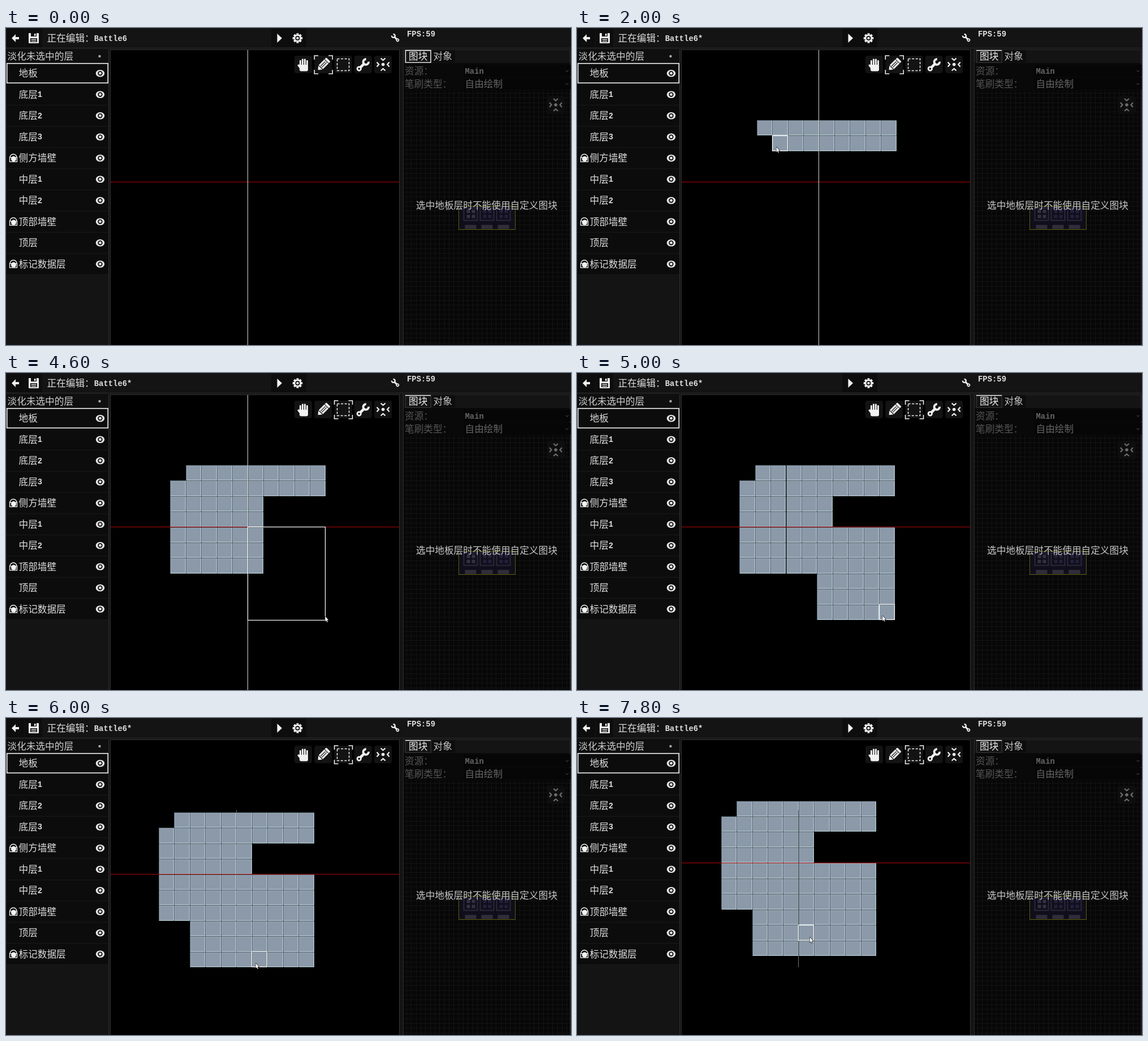
Write an HTML page with a canvas that moves like this. It is 999x561 px and loops after 8000 ms.

```html
<!DOCTYPE html>
<html lang="zh">
<head>
<meta charset="utf-8">
<title>Map editor</title>
<style>
  html, body { margin: 0; width: 100%; height: 100%; overflow: hidden; background: #000; }
  canvas { display: block; width: 999px; height: 561px; }
</style>
</head>
<body>
<canvas id="stage" width="999" height="561"></canvas>
<script>
const ctx = document.getElementById('stage').getContext('2d');
const LOOP = 8000, STEP = 200, CELL = 27.45, UNIT = 25 / 3;
const CJK = '300 16.67px "Noto Sans CJK JP", "Noto Sans CJK SC", "Noto Sans CJK", sans-serif';
const LATIN = 'bold 13.88px "Liberation Mono", monospace';
const WHITE = '#f2f2f2', DARK = '#0f0f0f';

// The hand's script; positions are in map cells. The pointer glides between actions.
const hover = (from, to, at) => ({ from, to, a: at, b: at });
const pen = (from, to, a, b) => ({ from, to, a, b, fill: from });
const area = (from, to, a, b) => ({ from, to, a, b, fill: to + STEP });
const actions = [
  hover(200, 200, [9.5, 3.8]),
  pen(600, 1200, [-3.5, -3.5], [4.5, -3.5]),
  pen(1400, 2000, [4.5, -2.5], [-2.75, -2.28]),
  hover(2400, 2400, [5.5, -6.7]),
  hover(2600, 2600, [6.2, -7.5]),
  area(3200, 3600, [-4.5, -2.5], [0.58, 2.32]),
  area(4000, 4600, [0.5, 0.5], [4.97, 5.74]),
  hover(5000, 5000, [4.2, 5.7]),
  area(5600, 5800, [-2.5, 3.5], [1.23, 5.71]),
  hover(6000, 7200, [1.23, 5.71]),
  hover(7400, 7400, [4.5, 5.3]),
  hover(7800, 7800, [0.7, 4.77])
];
const pans = [
  { from: 4800, to: 5000, dx: -3.1, dy: 0 },
  { from: 5000, to: 5400, dx: -17.1, dy: 4 },
  { from: 6000, to: 7000, dx: -15.4, dy: -20.2 }
];

const progress = (t, from, to) => to > from ? Math.min(1, Math.max(0, (t - from) / (to - from))) : 1;
const mix = (a, b, p) => a.map((v, i) => v + (b[i] - v) * p);

function originAt(t) {
  let x = 427.5, y = 272.5;
  for (const pan of pans) {
    const p = progress(t, pan.from, pan.to);
    x += pan.dx * p;
    y += pan.dy * p;
  }
  return [x, y];
}

// Pointer position in map cells
function handAt(t) {
  const i = Math.max(0, actions.findLastIndex(a => a.from <= t));
  const now = actions[i], next = actions[i + 1];
  if (t <= now.to || !next) return mix(now.a, now.b, progress(t, now.from, now.to));
  return mix(now.b, next.a, progress(t, now.to, next.from));
}

// Cells covered by a stroke or drag at time t: left, top, right, bottom
function span(action, t) {
  const [c, r] = handAt(Math.min(t, action.to)).map(Math.floor);
  const [c0, r0] = action.a.map(Math.floor);
  return [Math.min(c, c0), Math.min(r, r0), Math.max(c, c0) + 1, Math.max(r, r0) + 1];
}

function box(x, y, w, h, color) {
  ctx.fillStyle = color;
  ctx.fillRect(x, y, w, h);
}

function frame(x, y, w, h, color, width = 1) {
  ctx.strokeStyle = color;
  ctx.lineWidth = width;
  ctx.strokeRect(x, y, w, h);
}

function path(points) {
  ctx.beginPath();
  points.forEach(([x, y]) => ctx.lineTo(x, y));
}

function line(points, color, width) {
  ctx.strokeStyle = color;
  ctx.lineWidth = width;
  path(points);
  ctx.stroke();
}

function shape(points, color) {
  ctx.fillStyle = color;
  path(points);
  ctx.fill();
}

function disc(x, y, rx, color, ry = rx) {
  ctx.fillStyle = color;
  ctx.beginPath();
  ctx.ellipse(x, y, rx, ry, 0, 0, Math.PI * 2);
  ctx.fill();
}

function arc(x, y, r, from, to, width) {
  ctx.strokeStyle = WHITE;
  ctx.lineWidth = width;
  ctx.beginPath();
  ctx.arc(x, y, r, from, to);
  ctx.stroke();
}

function rounded(x, y, w, h, r, color) {
  ctx.fillStyle = color;
  ctx.beginPath();
  ctx.roundRect(x, y, w, h, r);
  ctx.fill();
}

function at(x, y, draw, turn = 0, scale = 1) {
  ctx.save();
  ctx.translate(x, y);
  ctx.rotate(turn);
  ctx.scale(scale, scale);
  draw();
  ctx.restore();
}

function spin(x, y, count, draw) {
  for (let i = 0; i < count; i++) at(x, y, draw, i * 2 * Math.PI / count);
}

// y is the middle of the line; CJK and Latin runs use their own fonts
function label(text, x, y, color = '#dedede') {
  ctx.fillStyle = color;
  for (const run of text.match(/[\x20-\x7e]+|[^\x20-\x7e]+/g)) {
    const latin = run.charCodeAt(0) < 127;
    ctx.font = latin ? LATIN : CJK;
    ctx.fillText(run, x, y + (latin ? 4.5 : 6.2));
    x += ctx.measureText(run).width;
  }
}

function eye(x, y) {
  disc(x, y, 7.7, '#e8e8e8', 6.3);
  disc(x, y, 4.2, DARK);
  disc(x, y, 2.4, '#e8e8e8');
}

function lock(x, y) {
  arc(x, y - 1, 6, Math.PI, 0, 1.4);
  frame(x - 6.5, y - 1, 13, 7.5, WHITE, 1.3);
  disc(x + 0.5, y + 1.5, 4.6, WHITE);
}

function wrench(x, y, turn, scale) {
  at(x, y, () => {
    box(-9, -2.3, 13, 4.6, WHITE);
    disc(-10, 0, 4.6, WHITE);
    disc(-10, 0, 1.8, DARK);
    arc(7, 0, 4.8, 0.7, Math.PI * 2 - 0.7, 3.8);
  }, turn, scale);
}

function gear(x, y) {
  spin(x, y, 8, () => box(-2, -8.7, 4, 5, WHITE));
  disc(x, y, 6.5, WHITE);
  disc(x, y, 4, DARK);
  disc(x, y, 2.3, WHITE);
}

function focusIcon(x, y, color) {
  disc(x, y, 2.8, color);
  spin(x, y, 4, () => line([[-4, -11], [0, -7.5], [4, -11]], color, 2.2));
}

function hand(x, y) {
  for (let i = 0; i < 4; i++)
    rounded(x - 6.5 + i * 4, y - 8 - 3 * Math.sin(i * Math.PI / 3), 2.9, 14, 1, WHITE);
  rounded(x - 6.5, y, 15, 11.5, 3, WHITE);
  line([[x - 9, y], [x - 3, y + 8]], WHITE, 3.5);
}

function pencil(x, y) {
  at(x, y, () => {
    rounded(-7, -5.2, 20, 10.4, 1.5, WHITE);
    shape([[-7, -5], [-13, 0], [-7, 5]], WHITE);
    for (const dy of [-2, 1]) box(-5, dy, 12, 1.1, DARK);
    for (const dx of [-7, 8]) box(dx, -5.2, 1.1, 10.4, DARK);
  }, -Math.PI / 4);
}

function arrow(x, y) {
  shape([[x - 7, y], [x, y - 7], [x, y + 7]], WHITE);
  box(x - 1, y - 2, 7, 4, WHITE);
}

function disk(x, y) {
  rounded(x, y, 18, 18, 1, WHITE);
  box(x + 4, y, 10, 6, DARK);
  box(x + 10, y + 1, 2.5, 4, WHITE);
  box(x + 3, y + 9, 12, 7, DARK);
  for (const dy of [10.5, 13.5]) box(x + 4.5, y + dy, 9, 1.4, WHITE);
}

function toolbar(t) {
  const x = i => 525.5 + i * 35.3;
  for (let i = 0; i < 5; i++) rounded(x(i) - 15.5, 49, 31, 31, 4, '#131313');
  hand(x(0), 65);
  pencil(x(1), 65);
  ctx.setLineDash([4, 2.6]);
  frame(x(2) - 10.5, 54.5, 21, 21, WHITE, 1.5);
  ctx.setLineDash([]);
  wrench(x(3), 65, -Math.PI / 4, 1);
  focusIcon(x(4), 64.5, WHITE);
  spin(x(t < 2600 ? 1 : 2) + 0.5, 65, 4, () =>
    line([[-16, -9], [-16, -16], [-9, -16]], WHITE, 1.6));
}

function topBar(t) {
  box(0, 0, 999, 36, '#141414');
  for (const x of [1, 33, 469, 500]) box(x, 1, 31, 33, '#0d0d0d');
  box(0, 35, 999, 1, '#2b2b2b');
  arrow(17, 18);
  disk(40, 9);
  label('正在编辑：Battle6' + (t >= 600 ? '*' : ''), 72.5, 18);
  shape([[479.5, 10], [488, 18], [479.5, 26]], WHITE);
  gear(515.5, 18);
  wrench(688, 17, -Math.PI * 3 / 4, 0.62);
  label('FPS:59', 709, 10);
}

function layers() {
  const names = ['地板', '底层1', '底层2', '底层3', '侧方墙壁', '中层1', '中层2', '顶部墙壁', '顶层', '标记数据层'];
  box(0, 36, 185, 525, '#141414');
  box(0, 38, 181, 23, DARK);
  label('淡化未选中的层', 2.5, 50, '#cfcfcf');
  disc(165.5, 50, 2.2, '#aaa');
  names.forEach((name, i) => {
    const y = 80.2 + i * 37.5;
    box(1, y - 18, 180, 36.4, '#0c0c0c');
    box(1, y + 18.4, 180, 1, '#191919');
    label(name, 22.5, y);
    eye(166.5, y);
    if (/墙壁|标记/.test(name)) lock(13, y);
  });
  frame(1.75, 62.75, 178.5, 34.5, WHITE, 1.6);
  box(181, 38, 1, 523, '#303030');
}

function tileset(x, y) {
  box(x, y, 100, 41, '#100e1b');
  for (let g = 0; g < 3; g++) {
    const gx = x + 9 + g * 29;
    frame(gx, y + 3, 24, 22, '#2b2938', 2);
    for (let i = 0; i < 4; i++)
      box(gx + 5 + (i % 2) * 9, y + 6 + (i >> 1) * 9, 6, 6, g ? '#22203a' : '#343242');
    box(gx + 2, y + 33, 20, 7, '#302e3a');
  }
  frame(x, y, 100, 41, '#5c5c0c');
}

function palette(t) {
  box(695, 36, 304, 525, '#141414');
  box(703, 62, 295, 49, '#090909');
  box(703, 111, 295, 450, '#070707');
  for (let x = 708.4; x < 998; x += UNIT) box(Math.floor(x), 111, 1, 450, '#131313');
  for (let y = 115; y < 561; y += UNIT) box(703, Math.round(y), 295, 1, '#131313');
  for (const x of [702, 997]) box(x, 38, 1, 523, '#2d2d2d');
  box(703, 38, 295, 1, '#292929');
  box(754, 39, 40, 22, '#0d0d0d');
  frame(706.5, 39.5, 44.5, 21.5, t < 600 ? WHITE : '#303030', 1.4);
  box(706, 39, 45, 1.4, WHITE);
  label('图块', 712, 50, '#f0f0f0');
  label('对象', 755.5, 50, '#c4c4c4');
  [['资源：', 'Main'], ['笔刷类型：', '自由绘制']].forEach(([name, value], i) => {
    const y = 76 + i * 23;
    box(809, y - 11, 189, 21, '#060606');
    label(name, 705, y, '#555');
    label(value, 811.5, y, '#666');
    line([[989.5, y - 1], [992, y + 1.2], [994.5, y - 1]], '#555', 1);
  });
  rounded(956, 120, 32, 32, 4, '#0e0e0e');
  focusIcon(972, 136, '#6c6c6c');
  tileset(800.5, 315.5);
  label('选中地板层时不能使用自定义图块', 725, 313.5, '#c8c8c8');
}

// Dark upper left edge, bright lower right edge, on whole pixels
function tile(left, top) {
  const x = Math.round(left), y = Math.round(top);
  const w = Math.round(left + CELL) - x, h = Math.round(top + CELL) - y;
  box(x, y, w, h, '#4d5a62');
  box(x + 1, y + 1, w - 1, h - 1, '#b4cad3');
  box(x + 1, y + 1, w - 2, h - 2, '#95a4b2');
  box(x + 2, y + 2, w - 4, h - 4, '#8b99a9');
}

function axes(t, ox, oy) {
  box(185, Math.floor(oy), 510, 1, '#ae0606');
  if (t < 5000) box(Math.floor(ox), 39, 1, 522, '#d8d8d8');
  else if (t >= 5400) box(Math.floor(ox), 163, 1, 278, '#69747a');
}

function pointer(x, y) {
  const outline = [[0, 0], [0, 9], [2, 7.4], [3.3, 10.4], [4.4, 9.9], [3.2, 7], [5.6, 6.6]];
  at(x + 0.5, y + 0.5, () => {
    line([...outline, [0, 0]], '#111', 1.2);
    shape(outline, '#fff');
  });
}

function viewport(t) {
  const [ox, oy] = originAt(t), [col, row] = handAt(t);
  const cx = ox + col * CELL, cy = oy + row * CELL;
  const dragging = actions.find(a => t >= a.from && t < a.fill);
  ctx.save();
  ctx.beginPath();
  ctx.rect(185, 39, 510, 522);
  ctx.clip();
  box(185, 39, 510, 522, '#000');
  for (const action of actions.filter(a => t >= a.fill)) {
    const [c0, r0, c1, r1] = span(action, t);
    for (let r = r0; r < r1; r++)
      for (let c = c0; c < c1; c++) tile(ox + c * CELL, oy + r * CELL);
  }
  axes(t, ox, oy);
  const overTools = cy < 82 && cx > 508;
  if (t >= STEP && !overTools) {
    const c = Math.floor(col), r = Math.floor(row);
    const [c0, r0, c1, r1] = dragging ? span(dragging, t) : [c, r, c + 1, r + 1];
    const x = Math.floor(ox + c0 * CELL), y = Math.floor(oy + r0 * CELL);
    frame(x + 0.5, y + 0.5, Math.round((c1 - c0) * CELL), Math.round((r1 - r0) * CELL), '#fff', 1.2);
  }
  toolbar(t);
  ctx.restore();
  frame(184.5, 38.5, 511, 523, '#333');
  if (t >= STEP) pointer(cx, cy);
}

function draw(now) {
  const t = Math.floor((now % LOOP) / STEP) * STEP;
  box(0, 0, 999, 561, '#141414');
  topBar(t);
  layers();
  palette(t);
  viewport(t);
}

const start = performance.now();
(function tick() {
  draw(performance.now() - start);
  requestAnimationFrame(tick);
})();
</script>
</body>
</html>
```
